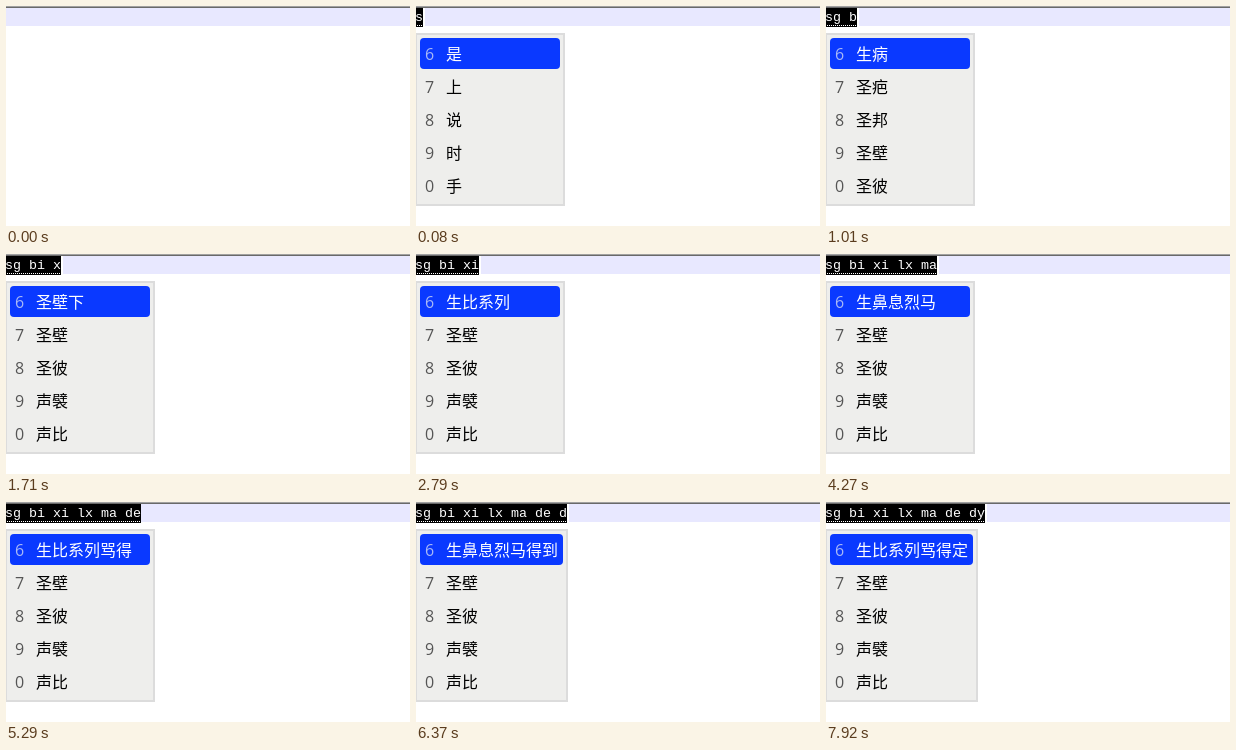
An HTML page with a canvas for the animation above (8000 ms loop, 404 by 220 pixels).

```html
<!DOCTYPE html>
<html lang="zh-CN">
<head>
<meta charset="utf-8">
<style>
  html, body { margin: 0; width: 100%; height: 100%; overflow: hidden; background: #fff; }
  canvas { display: block; }
</style>
</head>
<body>
<canvas id="stage" width="404" height="220"></canvas>
<script>
const ctx = document.getElementById('stage').getContext('2d');
const LOOP = 8000;
const BLINK = 530;
const BLINK_START = 485;
const CHAR = 8;
const ROW = 33;
const KEYS = '67890';
const CJK = '16px "Noto Sans CJK SC", "Noto Sans CJK", sans-serif';
const DIGIT = '16px "Open Sans", sans-serif';
const MONO = '13.33px "Liberation Mono", monospace';

// Once a whole phrase is suggested, these stay below it
const WORDS = '圣壁 圣彼 声襞 声比';
const phrase = top => `${top} ${WORDS}`;

// Key strokes: time, typed text, candidates
const strokes = [
  [80, 's', '是 上 说 时 手'],
  [470, 'sg', '生 声 省 圣 胜'],
  [1010, 'sg b', '生病 圣疤 圣邦 圣壁 圣彼'],
  [1240, 'sg bi', `${WORDS} 生鼻`],
  [1630, 'sg bi x', phrase('圣壁下')],
  [1940, 'sg bi xi', phrase('生鼻息')],
  [2790, 'sg bi xi', phrase('生比系列')],
  [2870, 'sg bi xi l', phrase('生比系列')],
  [3100, 'sg bi xi lx', phrase('生比系列')],
  [3960, 'sg bi xi lx m', phrase('生鼻息烈马')],
  [4270, 'sg bi xi lx ma', phrase('生鼻息烈马')],
  [4660, 'sg bi xi lx ma d', phrase('生比系列骂的')],
  [4900, 'sg bi xi lx ma de', phrase('生比系列骂得')],
  [5600, 'sg bi xi lx ma de d', phrase('生鼻息烈马得到')],
  [7070, 'sg bi xi lx ma de dy', phrase('生比系列骂得定')]
];

function rect(x, y, w, h, color) {
  ctx.fillStyle = color;
  ctx.fillRect(x, y, w, h);
}

function text(str, x, y, font, color) {
  ctx.font = font;
  ctx.fillStyle = color;
  ctx.fillText(str, x, y);
}

// A key stroke shows the caret; a steady clock toggles it from there
function caretVisible(t, since) {
  const beat = time => Math.floor((time - BLINK_START) / BLINK);
  return (beat(t) - beat(since)) % 2 === 0;
}

function drawEditor() {
  rect(0, 0, 404, 220, '#fff');
  rect(0, 0, 404, 1, '#a0a0a0');
  rect(0, 1, 404, 1, '#696969');
  rect(0, 2, 404, 18, '#e8e8ff');
}

function drawInput(typed, caret) {
  const end = typed.length * CHAR - 1;
  rect(0, 2, end, 19, '#000');
  [...typed].forEach((c, i) => text(c, i * CHAR - 1, 15, MONO, '#fff'));
  for (let x = 1; x < end; x += 2) rect(x, 19, 1, 1, '#fff');
  if (caret) rect(end, 2, 2, 19, '#fff');
}

function drawMenu(items) {
  const width = Math.max(149, 40 + items[0].length * 16);
  rect(0, 27, width, 173, '#dcdcdc');
  rect(1, 29, width - 3, 169, '#eeeeec');
  ctx.fillStyle = '#0a39ff';
  ctx.beginPath();
  ctx.roundRect(4, 32, width - 9, 31, 4);
  ctx.fill();
  items.forEach((item, i) => {
    const y = 54 + i * ROW;
    text(KEYS[i], 9, y, DIGIT, i ? '#555' : '#a9b9f6');
    text(item, 30, y, CJK, i ? '#000' : '#fff');
  });
}

function draw(t) {
  drawEditor();
  const stroke = strokes.filter(([time]) => time <= t).pop();
  if (!stroke) return;
  const [time, typed, menu] = stroke;
  drawInput(typed, caretVisible(t, time));
  drawMenu(menu.split(' '));
}

const start = performance.now();
function tick() {
  draw((performance.now() - start) % LOOP);
  requestAnimationFrame(tick);
}
tick();
</script>
</body>
</html>
```
